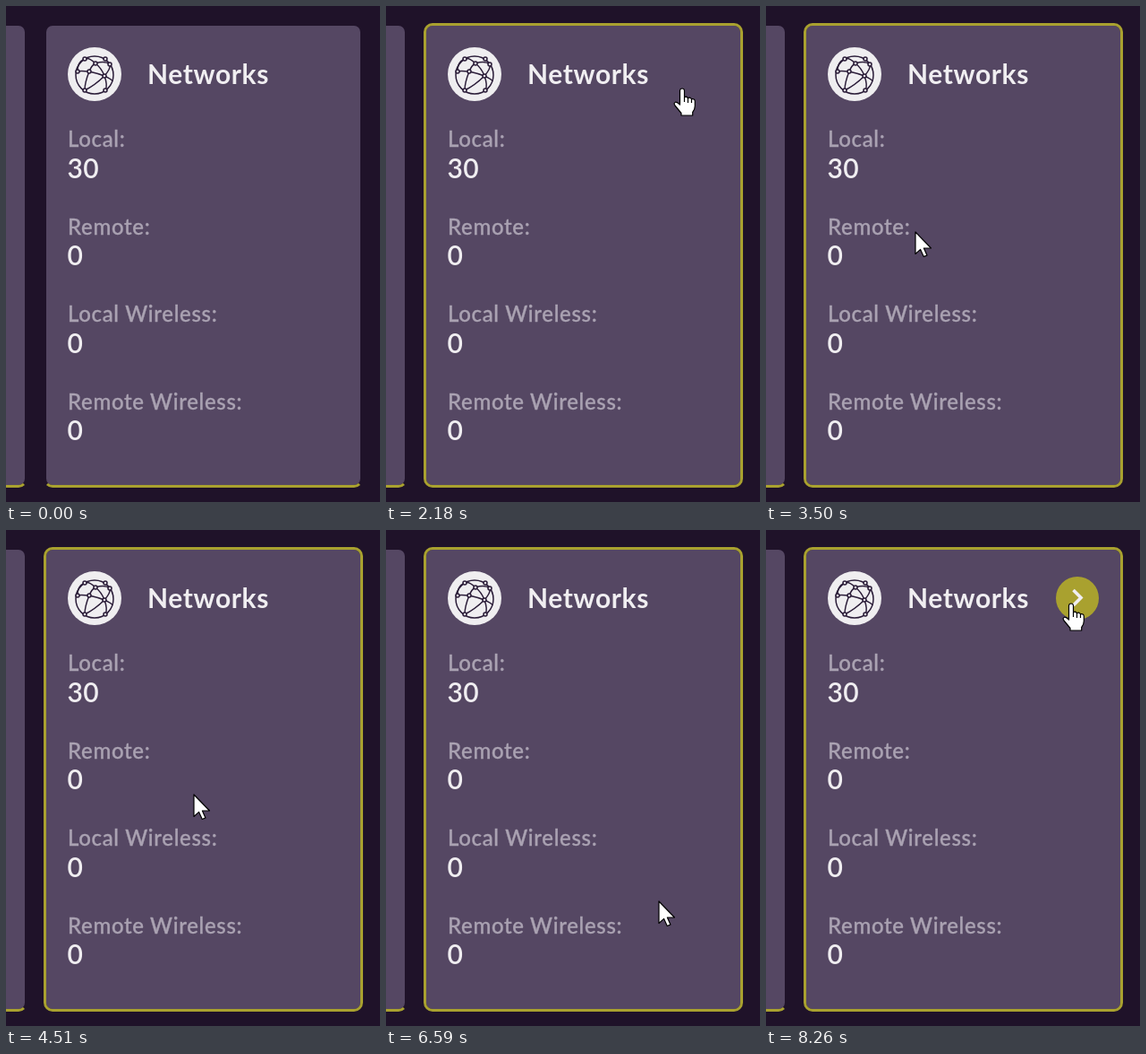
These frames come from a looping animation (418x553 px, 9.35 s). An HTML page:

```html
<!DOCTYPE html>
<html lang="en">
<head>
<meta charset="utf-8">
<title>Networks card</title>
<style>
  :root { --card: #554763; --accent: #a9a12f; --light: #f0eef1; --hover: 0; }
  html, body { margin: 0; width: 100%; height: 100%; overflow: hidden; background: #1f1229; }
  body { position: relative; }
  .card {
    position: absolute; box-sizing: border-box; top: 19px; width: 357px; height: 518px;
    background: var(--card) padding-box;
    border: 3px solid transparent; border-bottom-color: var(--accent); border-radius: 10px;
  }
  .previous { left: -333px; }
  .current { left: 42px; border-color: rgb(169 161 47 / var(--hover)); border-bottom-color: var(--accent); }
  svg { position: absolute; left: 0; top: 0; }
  text { font-family: Lato, "Open Sans", sans-serif; fill: var(--light); }
  .title { font-size: 30px; font-weight: 700; letter-spacing: .6px; }
  .label { font-size: 24px; font-weight: 500; letter-spacing: .67px; fill: #aaa2b2; stroke: #aaa2b2; stroke-width: .35; }
  .value { font-size: 30px; font-weight: 600; letter-spacing: .4px; }
  .globe { fill: none; stroke: #2a1c38; stroke-width: 1.5; }
  .cursor path { fill: #fff; stroke: #000; stroke-width: 1.2; stroke-linejoin: round; }
</style>
</head>
<body>
<div class="card previous"></div>
<div class="card current"></div>
<svg width="418" height="553" viewBox="0 0 418 553">
  <circle cx="99" cy="76" r="30" fill="#efeef0"/>
  <g id="globe" class="globe" transform="translate(99 77)"></g>
  <text class="title" x="158" y="87">Networks</text>
  <g id="rows"></g>
  <g id="button">
    <circle cx="348" cy="76" r="24" fill="#a9a12f"/>
    <path d="M343.5 67L352 75.5L343.5 84" fill="none" stroke="#f0eef1" stroke-width="3.6"/>
  </g>
  <g id="cursor" class="cursor">
    <path id="arrow" d="M0 0V24.5L5.6 19.4L9.3 27.5L13 25.9L9.4 18H17.5Z"/>
    <g id="hand">
      <path d="M-2.5 18V2.5a2.4 2.4 0 0 1 5 0V10q2-2 4 .8q2.2-1.8 4 1q3.5-.8 3.8 2.2v5.5q0 4-2.6 7V30H-1v-2.5L-8 19q-2-3 .6-3.8q2-.2 4.9 2.8Z"/>
      <path d="M2.5 10v5M6.5 11v5M10.5 12v4"/>
    </g>
  </g>
</svg>
<script>
const LOOP = 9350;
const STEP = 69;
const $ = id => document.getElementById(id);

// Each move bends from the last resting place, by way of "via", to the next.
const home = [300, -30];
const moves = [
  { start: 1100, end: 1590, via: [322, 92], to: [318, 66] },
  { start: 2180, end: 2650, via: [388, 176], to: [175, 176] },
  { start: 2920, end: 3500, via: [316, 214], to: [167, 252] },
  { start: 4230, end: 4850, via: [215, 290], to: [243, 347] },
  { start: 5240, end: 5790, via: [293, 366], to: [287, 442] },
  { start: 6590, end: 7460, via: [379, 314], to: [357, 79], power: 1.5 },
  { start: 7860, end: 8260, via: [347, 70], to: [341, 82] }
];

const rows = [["Local:", 30], ["Remote:", 0], ["Local Wireless:", 0], ["Remote Wireless:", 0]];
$("rows").innerHTML = rows.map(([label, value], i) => {
  const y = Math.round(157 + i * 97.5);
  return `<text class="label" x="69" y="${y}">${label}</text>
    <text class="value" x="68.5" y="${191.5 + Math.floor(i * 97.5)}">${value}</text>`;
}).join("");

// Globe: nodes around the centre, joined by edges that bulge outwards.
const nodes = {
  a: [-11, -18], b: [12, -18], c: [17, -12], d: [-19, -4], e: [-6, -4],
  f: [1, -13], g: [11, 1], h: [-11, 17], i: [12, 17], j: [20, 7]
};
const edges = "ad af fc fe fg de eg eh gh gi cg gj";

function edgePath([from, to]) {
  const p = nodes[from], q = nodes[to];
  const control = p.map((v, k) => (v + q[k]) * 0.65);
  return `M${p}Q${control} ${q}`;
}

$("globe").innerHTML = `<circle r="21"/><path d="${edges.split(" ").map(edgePath).join("")}"/>` +
  Object.values(nodes).slice(0, -1)
    .map(([x, y]) => `<circle cx="${x}" cy="${y}" r="2" fill="#efeef0"/>`).join("");

function cursorAt(time) {
  const index = moves.findLastIndex(move => time >= move.start);
  if (index < 0) return home;
  const { start, end, via, to, power = 1 } = moves[index];
  const from = index ? moves[index - 1].to : home;
  const gaps = Math.round((end - start) / STEP);
  const step = Math.min(gaps, Math.floor((time - start) / (end - start) * gaps + 0.02)) + 1;
  const u = 1 - (1 - step / (gaps + 1)) ** power;
  return from.map((v, k) =>
    Math.round((1 - u) ** 2 * v + 2 * u * (1 - u) * via[k] + u * u * to[k]));
}

// Opacity rises in equal hard steps from the start time.
function fade(time, start, count) {
  const step = Math.floor((time - start) / STEP) + 1;
  return Math.max(0, Math.min(1, step / count));
}

function draw(time) {
  const [x, y] = cursorAt(time);
  const overHeader = y > 40 && y < 110;
  $("cursor").setAttribute("transform", `translate(${x} ${y})`);
  $("arrow").style.display = overHeader ? "none" : "";
  $("hand").style.display = overHeader ? "" : "none";
  $("button").style.opacity = fade(time, 7383, 4);
  document.documentElement.style.setProperty("--hover", fade(time, 1240, 3));
}

const origin = performance.now();
function tick() {
  draw((performance.now() - origin) % LOOP);
  requestAnimationFrame(tick);
}
tick();
</script>
</body>
</html>
```
